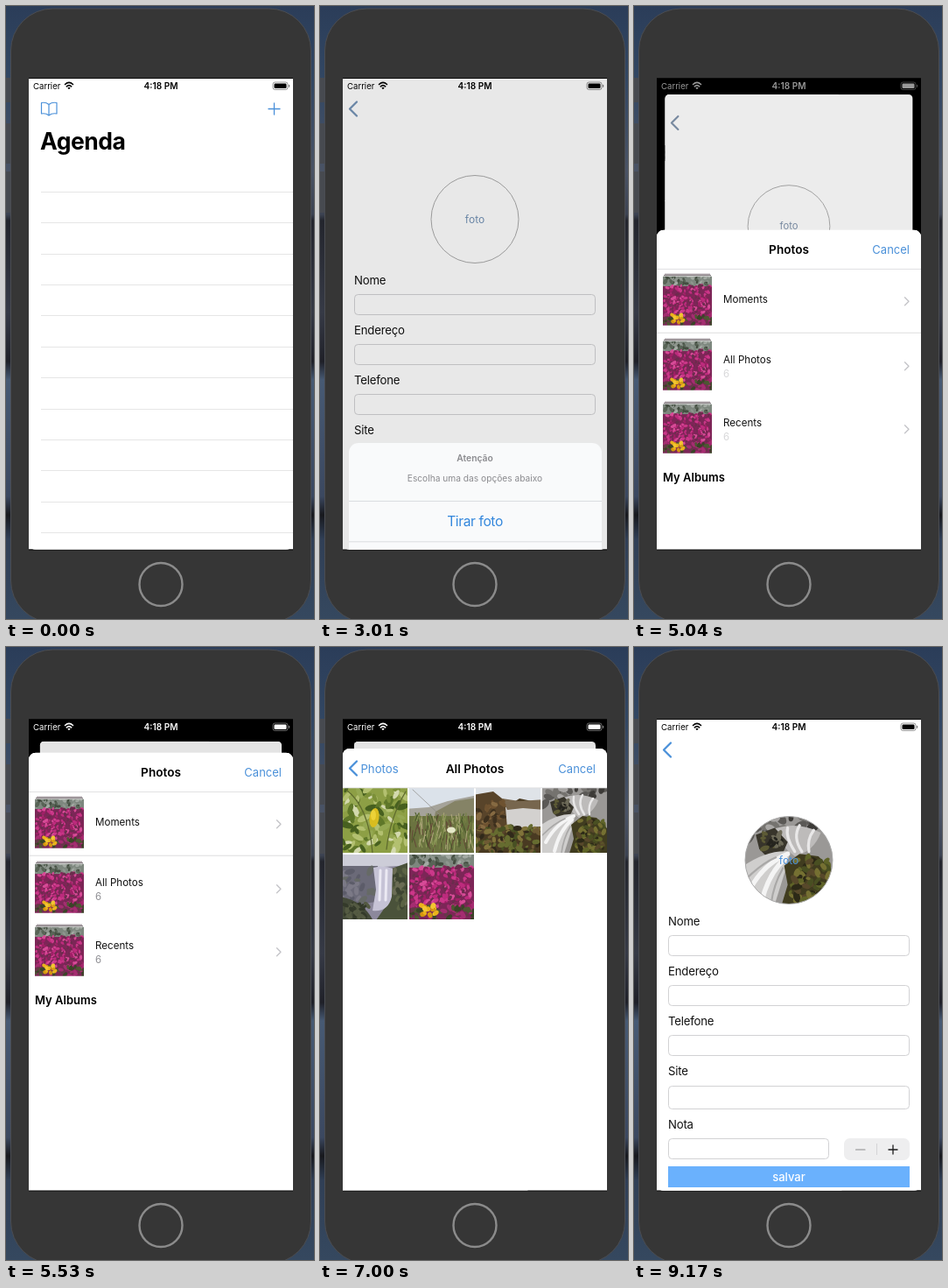
These frames come from a looping animation (352x700 px, 9730 ms). An HTML page:

```html
<!DOCTYPE html>
<html lang="pt">
<head>
<meta charset="utf-8">
<title>Agenda</title>
<style>
html, body { margin: 0; width: 100%; height: 100%; overflow: hidden; background: #2c3c55; }
svg { display: block; }
text { font-family: Inter, Roboto, sans-serif; }
.mid { text-anchor: middle; }
.bold { font-weight: 600; }
.line { fill: none; stroke-linecap: round; stroke-linejoin: round; }
</style>
</head>
<body>
<svg id="stage" width="352" height="700" viewBox="0 0 352 700"></svg>
<script>
const LOOP = 9730, STEP = 70;
const BLUE = '#4a90d9', TINT = [74, 144, 217], MUTED = [150, 150, 155];
const X = 26, Y = 83, W = 302, H = 537.5;
const PICKER_TOP = 116, ALERT_TOP = 402;

// ---- markup helpers
const rect = (x, y, w, h, fill, more = '') =>
  `<rect x="${x}" y="${y}" width="${w}" height="${h}" fill="${fill}" ${more}/>`;
const text = (x, y, size, str, fill = '#111', more = '') =>
  `<text x="${x}" y="${y}" font-size="${size}" fill="${fill}" ${more}>${str}</text>`;
const path = (d, stroke, width = 1, more = '') =>
  `<path class="line" d="${d}" stroke="${stroke}" stroke-width="${width}" ${more}/>`;
const shape = (d, fill, more = '') => `<path d="${d}" fill="${fill}" ${more}/>`;
const group = (id, body, more = '') => `<g id="${id}" ${more}>${body}</g>`;
const repeat = (n, fn) => Array.from({ length: n }, (_, i) => fn(i)).join('');
const photo = (id, x, y, w, h = w) =>
  `<use href="#${id}" x="${x}" y="${y}" width="${w}" height="${h}"/>`;
const chevron = (x, y) => `M${x + 8} ${y - 8}l-8 8l8 8`;

// ---- small pictures on a 74 x 74 field
function random(seed) {
  return () => (seed = (seed * 16807) % 2147483647) / 2147483647;
}
function scatter(n, seed, [x, y, w, h], rx, ry, colors) {
  const r = random(seed * 7919);
  return repeat(n, () => {
    const cx = x + r() * w, cy = y + r() * h, k = 0.6 + r() * 0.8;
    const c = colors[Math.floor(r() * colors.length)];
    const turn = Math.floor(r() * 180);
    return `<ellipse rx="${(rx * k).toFixed(1)}" ry="${(ry * k).toFixed(1)}" fill="${c}"
      transform="translate(${cx.toFixed(1)} ${cy.toFixed(1)}) rotate(${turn})"/>`;
  });
}
function blades(n, seed, top, colors) {
  const r = random(seed * 7919);
  return repeat(n, i => {
    const x = r() * 74, y = top + r() * 34;
    return path(`M${x.toFixed(1)} ${y.toFixed(1)}l${(r() * 8 - 4).toFixed(1)} ${(6 + r() * 7).toFixed(1)}`,
      colors[i % colors.length], 1.1);
  });
}
const base = color => rect(-4, -4, 82, 82, color);
const pictures = {
  lemon: base('#8d9f45') +
    scatter(90, 3, [0, 0, 74, 74], 6, 2.6, ['#5f7729', '#b3c070', '#95a852', '#47601f', '#d3d9ae', '#7c9038']) +
    path('M4 2Q30 22 34 74M72 4Q54 34 50 70', '#5f6b2e', 1.3) +
    '<ellipse cx="36" cy="34" rx="5.5" ry="11" fill="#d9bd1f" transform="rotate(8 36 34)"/>' +
    '<ellipse cx="35" cy="31" rx="3" ry="6" fill="#ecd238"/>',
  shore: base('#dbe2ea') +
    shape('M-4 24L22 22L44 15L78 8V42H-4z', '#a5a39a') +
    shape('M30 27L52 15L78 11V38H28z', '#858366') +
    path('M4 2L34 30', '#8c8a86', 0.7) +
    rect(-4, 32, 82, 46, '#6b7340') +
    blades(170, 5, 28, ['#8f9b5a', '#4c5c2d', '#a9a577', '#644b38', '#758244']) +
    '<ellipse cx="48" cy="48" rx="5" ry="3.500" fill="#e6e9c9"/>',
  cave: base('#493a22') +
    shape('M-4 -4H78V18L50 12L34 22L-4 14z', '#dfe3e8') +
    shape('M-4 8L20 4L30 12L40 30L33 52H-4z', '#58442a') +
    shape('M34 22Q52 16 78 20V44L36 46z', '#d3d1cf') +
    shape('M30 12L50 15L78 13V25L54 23L36 25z', '#77664e') +
    scatter(100, 8, [0, 44, 74, 30], 3.6, 2.2, ['#666c30', '#30291a', '#80733a', '#485023', '#6e5a34']) +
    scatter(34, 6, [0, 12, 32, 34], 3.6, 2, ['#6e5230', '#3d301e', '#866a42']),
  rocks: base('#9a9896') +
    scatter(40, 4, [2, 0, 70, 20], 5, 3, ['#5b5956', '#75736f', '#3c3a37', '#a8a6a4']) +
    shape('M24 11Q44 4 64 14Q58 30 42 34Q30 26 24 11', '#bdbbba') +
    path('M36 10Q34 18 42 30M46 8Q40 18 48 30M58 12Q52 20 54 30', '#e9e8e8', 2.4) +
    shape('M9 16L25 10L36 22L32 31L18 34L12 28z', '#38352b') +
    scatter(18, 2, [13, 14, 18, 16], 3, 1.6, ['#5d5b35', '#25241e', '#6d6a58']) +
    shape('M-4 44Q18 28 38 30L34 46L24 78H-4z', '#cfcecd') +
    path('M4 62Q16 40 36 32M14 72Q20 48 34 36', '#f4f4f4', 4) +
    path('M0 54Q14 40 26 35M22 74Q24 58 32 44', '#a9a8a7', 1.6) +
    shape('M33 42L46 32L62 34L74 46L78 78H30L36 58z', '#403c1f') +
    scatter(75, 9, [38, 36, 33, 36], 3.4, 2, ['#5f6428', '#2c2917', '#757032', '#494f22', '#57482a']),
  veil: base('#8c889c') +
    shape('M-4 -4H78V12L46 14L-4 13z', '#cdcdd8') +
    shape('M-4 13L40 13L38 54L-4 60z', '#6b6a78') +
    scatter(24, 15, [0, 18, 34, 34], 5, 2.6, ['#7b7986', '#5c5c69', '#666a66']) +
    shape('M56 16L78 8V78H36L54 52z', '#4a523a') +
    scatter(28, 21, [58, 18, 16, 54], 4, 2.4, ['#5b6344', '#3d4431', '#6a6c54']) +
    shape('M35 15Q47 12 57 16L56 48Q52 66 34 64L38 40z', '#c6c3d6') +
    path('M43 18L42 52M50 18L49 52', '#ebe9f3', 3) +
    shape('M-4 48Q24 52 36 78H-4z', '#434938') +
    scatter(28, 7, [0, 56, 28, 16], 4, 2, ['#545a42', '#343a2a']),
  bloom: base('#7c2657') +
    rect(-4, -4, 82, 19, '#7d877e') +
    scatter(50, 11, [0, 0, 74, 13], 3.4, 2, ['#586456', '#a3aaa3', '#434d40', '#8e968e']) +
    scatter(260, 13, [0, 14, 74, 46], 2.7, 1.6, ['#bd2b7d', '#d74b97', '#a01f66', '#cb3789', '#6a2d4c', '#842558']) +
    scatter(50, 17, [0, 58, 74, 16], 3.5, 2, ['#4d5732', '#663848', '#3a4427', '#a52d71']) +
    scatter(16, 19, [14, 58, 17, 11], 2.8, 2.2, ['#eab31b', '#f2c631', '#d6960f'])
};
const symbols = Object.entries(pictures).map(([id, body]) =>
  `<symbol id="${id}" viewBox="0 0 74 74" preserveAspectRatio="none">
    <g filter="url(#soft)">${body}</g></symbol>`).join('');

// ---- scene parts
const sky = [[0, '#2b3d59'], [.12, '#324763'], [.27, '#4a5365'], [.34, '#3c4352'], [.35, '#23252d'],
  [.5, '#363a46'], [.58, '#1f2028'], [.61, '#475a74'], [.8, '#3b4860'], [.83, '#17181d'],
  [.87, '#303f56'], [1, '#35485f']];

const device =
  rect(0, 0, 352, 700, 'url(#sky)') +
  [[82, 28], [134, 46], [189, 47]].map(([y, h]) => rect(-3, y, 9, h, '#474a50', 'rx="2"')).join('') +
  rect(5.5, 3, 343, 701, '#363636', 'rx="48" stroke="#4b4d52"') +
  rect(X, Y - 1, W, H + 2, '#0b0b0b') +
  '<circle cx="177" cy="660.5" r="24.5" fill="none" stroke="#8b8b8b" stroke-width="2.4"/>';

const agenda = rect(X, Y, W, H, '#fff') +
  text(39, 164, 26.5, 'Agenda', '#000', 'font-weight="700" letter-spacing="-.5"') +
  repeat(12, i => rect(40, Math.round(212 + i * 35.37), 288, 1, '#e6e6e6'));

const field = (y, h, w = 275) =>
  rect(39.5, y + .5, w, h - 1, 'none', 'rx="4" stroke="#d2d2d4"');
const labels = [['Nome', 317.5], ['Endereço', 374.5], ['Telefone', 431.5], ['Site', 489], ['Nota', 549.5]];
const form = rect(X, Y, W, H, '#fff') +
  group('shot', photo('rocks', 127, 193, 100), 'clip-path="url(#round)"') +
  '<circle cx="177" cy="243.5" r="50" fill="none" stroke="#a9a9a9"/>' +
  text(177, 247.5, 12, 'foto', 'currentColor', 'class="mid" id="foto"') +
  labels.map(([s, y]) => text(39, y, 13.2, s, '#111', 'letter-spacing="-.2"')).join('') +
  field(329, 24) + field(386, 24) + field(443, 24) + field(501, 27) + field(561, 24, 183) +
  rect(240, 561, 75, 25, '#eeeeef', 'rx="6.5"') + rect(277, 567, 1, 13, '#d4d4d6') +
  path('M253.5 574H264', '#8c8c8c', 1.2) + path('M291 574H301M296 569V579', '#1c1c1c', 1.3) +
  rect(39, 593, 276, 24, '#6ab1fd') +
  text(177, 609.5, 13, 'salvar', '#fff', 'class="mid" font-weight="500"');

const icons =
  group('book', path('M49 112.5Q45.5 109.5 40.5 110.5V123Q45.5 122 49 125Q52.5 122 58 123V110.5Q52.5 109.5 49 112.5V125', BLUE, 1.2)) +
  group('plus', path('M300 117.5H313M306.5 111V124', BLUE, 1.3)) +
  group('back', path(chevron(34, 117.5), 'currentColor', 2.3));

const status = text(31, 95.2, 9.6, 'Carrier') +
  path('M67.5 89.5Q72 85.3 76.5 89.5M69.3 91.8Q72 89.3 74.7 91.8', 'currentColor', 1.6) +
  shape('M70.4 93.4Q72 92.2 73.6 93.4L72 95.3z', 'currentColor') +
  text(177, 95.2, 10.1, '4:18 PM', '#111', 'class="mid bold"') +
  rect(305, 87, 17, 8.5, 'none', 'rx="2.4" stroke="currentColor" stroke-width=".8" opacity=".5"') +
  rect(306.5, 88.5, 14, 5.5, 'currentColor', 'rx="1.2"') +
  rect(323, 89.8, 1.2, 3, 'currentColor', 'rx=".6" opacity=".5"');

// local origin: top left of the sheet
const alertBox = rect(0, 0, 289, 159, '#f9fafb', 'rx="11"') +
  text(144, 21.5, 10.3, 'Atenção', '#8a8a8e', 'class="mid bold"') +
  text(144, 44, 10.2, 'Escolha uma das opções abaixo', '#8a8a8e', 'class="mid"') +
  rect(0, 112.5, 289, 46.5, '#dcdde0', 'id="pressed"') +
  rect(0, 66, 289, .8, '#d3d6da') + rect(0, 112.5, 289, .8, '#d3d6da') +
  text(144, 95.5, 15.6, 'Tirar foto', '#3387dc', 'class="mid" letter-spacing="-.4"') +
  text(144, 142, 15.6, 'Biblioteca', '#3387dc', 'class="mid" letter-spacing="-.4"') +
  rect(0, 165.5, 289, 46.5, '#fff', 'rx="11"') +
  text(144, 194.5, 15.6, 'Cancelar', '#3387dc', 'class="mid bold" letter-spacing="-.4"');

const album = (name, y, ty, count) =>
  rect(9, y, 52, 1, '#8b7f86') + rect(8, y + 1.5, 54, 1, '#6d6468') +
  photo('bloom', 7, y + 3, 56, 56) +
  text(76, ty, 11.6, name) +
  (count ? text(76, ty + 16, 11.4, count, '#8e8e93', 'class="count"') : '') +
  path(`M283.5 ${y + 27}l4.5 4.5l-4.5 4.5`, '#c3c3c7', 1.3);
const albums = rect(0, 0, W, H, '#fff') +
  rect(0, 119, W, 72, '#d3d3d8', 'id="chosen"') +
  album('Moments', 50, 83.7) + rect(0, 117, W, 1, '#dcdcde') +
  album('All Photos', 124, 152, '6') + album('Recents', 196, 224, '6') +
  text(7, 287, 13, 'My Albums', '#000', 'class="bold"');

const grid = rect(0, 0, W, H, '#fff') + group('thumbs',
  ['lemon', 'shore', 'cave', 'rocks', 'veil', 'bloom']
    .map((id, i) => photo(id, i % 4 * 76, 45 + (i >> 2) * 76, 74)).join(''));

const bar = rect(0, -20, W, 65, '#fff') + rect(0, 44.5, W, .8, '#dadadc') +
  text(151, 27.5, 13.6, 'Photos', '#000', 'class="mid bold" id="title"') +
  text(42, 27.5, 13.2, 'Photos', BLUE, 'class="mid" id="backTitle"') +
  text(151, 27.5, 13.7, 'All Photos', '#000', 'class="mid bold" id="next"') +
  group('backMark', path(chevron(8, 22.5), BLUE, 2.3)) +
  text(289, 27.5, 13, 'Cancel', BLUE, 'text-anchor="end"');

const picker = group('albums', albums) + rect(0, 0, W, H, '#000', 'id="listDim"') +
  group('grid', grid) + group('bar', bar);

document.getElementById('stage').innerHTML = `<defs>
  <linearGradient id="sky" x1="0" y1="0" x2="0" y2="1">${
    sky.map(([o, c]) => `<stop offset="${o}" stop-color="${c}"/>`).join('')}</linearGradient>
  <filter id="soft"><feGaussianBlur stdDeviation=".55"/></filter>
  <clipPath id="screen">${rect(X, Y, W, H, '#000')}</clipPath>
  <clipPath id="cardClip">${rect(X, Y, W, H + 60, '#000', 'id="cardEdge"')}</clipPath>
  <clipPath id="sheetClip">${rect(0, 0, W, 700, '#000', 'rx="8"')}</clipPath>
  <clipPath id="round"><circle cx="177" cy="243.5" r="50"/></clipPath>
  ${symbols}</defs>` + device +
  `<g clip-path="url(#screen)">` +
  rect(X, Y, W, H, '#000') +
  group('card', group('agenda', agenda) + rect(X, Y, W, H, '#000', 'id="pushDim"') +
    group('form', form) + icons + rect(X, Y, W, H + 60, '#000', 'id="cardDim"'),
    'clip-path="url(#cardClip)"') +
  group('status', status) +
  rect(X, Y, W, H, '#000', 'id="alertDim"') +
  group('alert', alertBox) +
  group('picker', picker, 'clip-path="url(#sheetClip)"') + '</g>';

// ---- motion
const parts = {};
document.querySelectorAll('#stage [id]').forEach(el => parts[el.id] = el);
const statusText = parts.status.querySelectorAll('text');
const counts = document.querySelectorAll('.count');
const clamp = v => Math.min(1, Math.max(0, v));
const ramp = (t, from, to) => clamp((t - from) / (to - from));
const mix = (a, b, p) => `rgb(${a.map((v, i) => Math.round(v + (b[i] - v) * p))})`;
function spring(t, from, rate) {
  const x = Math.max(0, t - from) / 1000 * rate;
  const p = 1 - (1 + x) * Math.exp(-x);
  return p > .997 ? 1 : p;
}
const fade = (id, v) => parts[id].setAttribute('opacity', v);
const move = (id, x, y = 0, more = '') =>
  parts[id].setAttribute('transform', `translate(${x} ${y}) ${more}`);

function draw(t) {
  const push = spring(t, 1870, 10);
  move('agenda', -.3 * W * push);
  move('form', W * (1 - push));
  fade('pushDim', .1 * push);
  fade('book', 1 - clamp(push * 1.8));
  fade('plus', t < 1750 ? 1 : .2 * (1 - clamp(push * 1.8)));
  fade('back', clamp(push * 1.6 - .6));

  fade('shot', t < 8050 ? 0 : 1);
  fade('foto', t < 2660 ? 1 : .25 + .75 * ramp(t, 2700, 2900));

  const alert = spring(t, 2832, 10.5) - spring(t, 3980, 9.5);
  move('alert', 33, ALERT_TOP + (1 - alert) * 219);
  fade('alertDim', .165 * alert);
  fade('pressed', t >= 3780 ? 1 : 0);

  const leave = spring(t, 8044.5, 8.5);
  const sheet = spring(t, 4740, 8.5) - leave;
  const scale = 1 - 26 / W * sheet;
  move('card', 177, Y + 25 * sheet, `scale(${scale}) translate(-177 ${-Y})`);
  parts.card.setAttribute('color', mix(TINT, MUTED, Math.max(alert, sheet)));
  parts.cardEdge.setAttribute('rx', 5 * clamp(sheet * 3));
  fade('cardDim', .105 * sheet);
  move('picker', X, PICKER_TOP + (1 - sheet) * 504);

  const light = leave > 0 ? 1 - ramp(leave, .55, .92) : sheet ** 1.6;
  const ink = mix([0, 0, 0], [255, 255, 255], light);
  parts.status.setAttribute('color', ink);
  statusText.forEach(el => el.setAttribute('fill', ink));

  const open = spring(t, 6029, 9);
  const slide = open ** 1.15;
  const extra = leave > 0 ? 17 : 0;
  move('albums', -.3 * W * open);
  fade('listDim', .075 * open);
  fade('chosen', t >= 5880 ? 1 : 0);
  move('grid', W * (1 - open));
  move('thumbs', 0, Math.min(extra, 20 * leave));
  move('bar', 0, extra);
  move('title', -109 * slide);
  fade('title', 1 - open * open);
  move('backTitle', 109 * (1 - slide));
  fade('backTitle', open);
  move('next', 140 * (1 - open));
  fade('next', open);
  fade('backMark', open);
  counts.forEach(el => el.setAttribute('opacity', ramp(t, 4900, 5300)));
}

const start = performance.now();
function tick() {
  const t = (performance.now() - start) % LOOP;
  draw(Math.floor(t / STEP) * STEP);
  requestAnimationFrame(tick);
}
tick();
</script>
</body>
</html>
```
